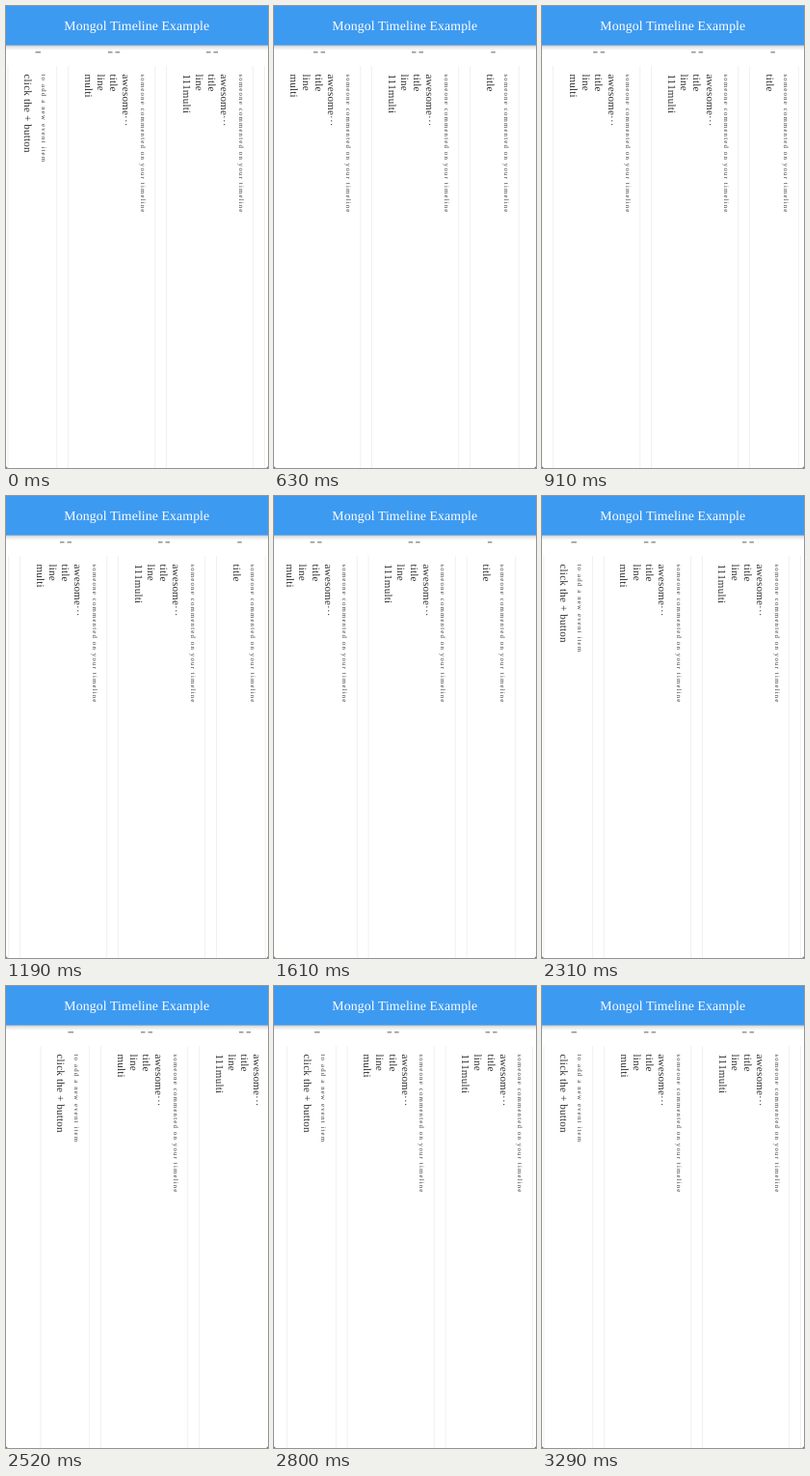
These frames come from a looping animation (272x478 px, 3.85 s). An HTML page:

```html
<!DOCTYPE html>
<html lang="en">
<head>
<meta charset="utf-8">
<title>Mongol Timeline Example</title>
<style>
  html, body { margin: 0; width: 100%; height: 100%; overflow: hidden; background: #fff; }
  svg { display: block; width: 100%; height: 100%; }
  text { font-family: "Liberation Serif", "Times New Roman", serif; white-space: pre; text-rendering: geometricPrecision; }
  .bar { font-size: 13.8px; letter-spacing: .1px; fill: #fff; text-anchor: middle; }
  .title { font-size: 11.1px; letter-spacing: .18px; fill: #303030; }
  .note { font-size: 6.8px; letter-spacing: 1.17px; fill: #3c3c3c; }
  .edge { stroke: #f0f0f0; stroke-width: 1; }
  .mark { fill: #828282; }
</style>
</head>
<body>
<svg viewBox="0 0 272 478">
  <defs>
    <linearGradient id="shade" x2="0" y2="1">
      <stop offset="0" stop-color="#000" stop-opacity=".25"/>
      <stop offset=".4" stop-color="#000" stop-opacity=".1"/>
      <stop offset="1" stop-color="#000" stop-opacity="0"/>
    </linearGradient>
  </defs>
  <rect width="272" height="478" fill="#fff"/>
  <g id="list"></g>
  <rect y="40" width="272" height="6" fill="url(#shade)"/>
  <rect width="272" height="40.6" fill="#3d9af1"/>
  <text class="bar" x="135.8" y="24.7">Mongol Timeline Example</text>
  <path d="M0 475.5Q0 478 2.5 478H0ZM272 475.5Q272 478 269.5 478H272Z" fill="#444"/>
</svg>
<script>
  const LOOP = 3850, TICK = 70, LINE = 13.3;
  const list = document.getElementById('list');
  const comment = 'someone commented on your timeline';

  // marks: [x, width] of the short dashes above each card
  const cards = [
    { x: 2, w: 50.7, marks: [[30.5, 5.5]], lines: ['click the + button'], note: 'to add a new event item' },
    { x: 64.5, w: 90.2, marks: [[106, 4.5], [113.5, 4.5]], lines: ['multi', 'line', 'title', 'awesome···'], note: comment },
    { x: 166.5, w: 90.2, marks: [[208, 4.5], [215.5, 4.5]], lines: ['111multi', 'line', 'title', 'awesome···'], note: comment },
    { x: 268.5, w: 50.7, marks: [[290.3, 4.5]], lines: ['title'], note: comment }
  ];

  // Each swipe drags to a peak, then springs back to rest.
  const swipes = [
    { start: 420, top: 630, end: 1190, from: 0, peak: -65, rest: -50, tau: 92 },
    { start: 1330, top: 1540, end: 1960, from: -50, peak: -73, rest: -50, tau: 85 },
    { start: 2100, top: 2520, end: 3290, from: -50, peak: 34, rest: 0, tau: 124 }
  ];

  function add(tag, attrs, content) {
    const el = document.createElementNS('http://www.w3.org/2000/svg', tag);
    for (const key in attrs) el.setAttribute(key, attrs[key]);
    if (content) el.textContent = content;
    list.appendChild(el);
  }

  function vertical(kind, x, content) {
    add('text', { class: kind, transform: `translate(${x} 70.5) rotate(90)` }, content);
  }

  function addCard({ x, w, marks, lines, note }) {
    for (const side of [x, x + w]) {
      add('line', { class: 'edge', x1: side, x2: side, y1: 62, y2: 478 });
    }
    for (const [left, width] of marks) {
      add('rect', { class: 'mark', x: left, y: 47.2, width, height: 1.3 });
    }
    const base = x + 17;
    lines.forEach((line, i) => vertical('title', base + i * LINE, line));
    vertical('note', base + (lines.length - 1) * LINE + 18.4, note);
  }

  function scrollAt(t) {
    let x = 0;
    for (const s of swipes) {
      if (t <= s.start) break;
      if (t < s.top) {
        const p = (t - s.start) / (s.top - s.start);
        x = s.from + (s.peak - s.from) * (1 - (1 - p) ** 1.3);
      } else if (t < s.end) {
        const u = (t - s.top) / s.tau;
        x = s.rest + (s.peak - s.rest) * (1 + u) * Math.exp(-u);
      } else {
        x = s.rest;
      }
    }
    return x;
  }

  function draw(ms) {
    const t = Math.floor((ms % LOOP) / TICK) * TICK;
    list.setAttribute('transform', `translate(${scrollAt(t).toFixed(2)} 0)`);
  }

  cards.forEach(addCard);
  draw(0);
  const begin = performance.now();
  function frame() {
    draw(performance.now() - begin);
    requestAnimationFrame(frame);
  }
  requestAnimationFrame(frame);
</script>
</body>
</html>
```
